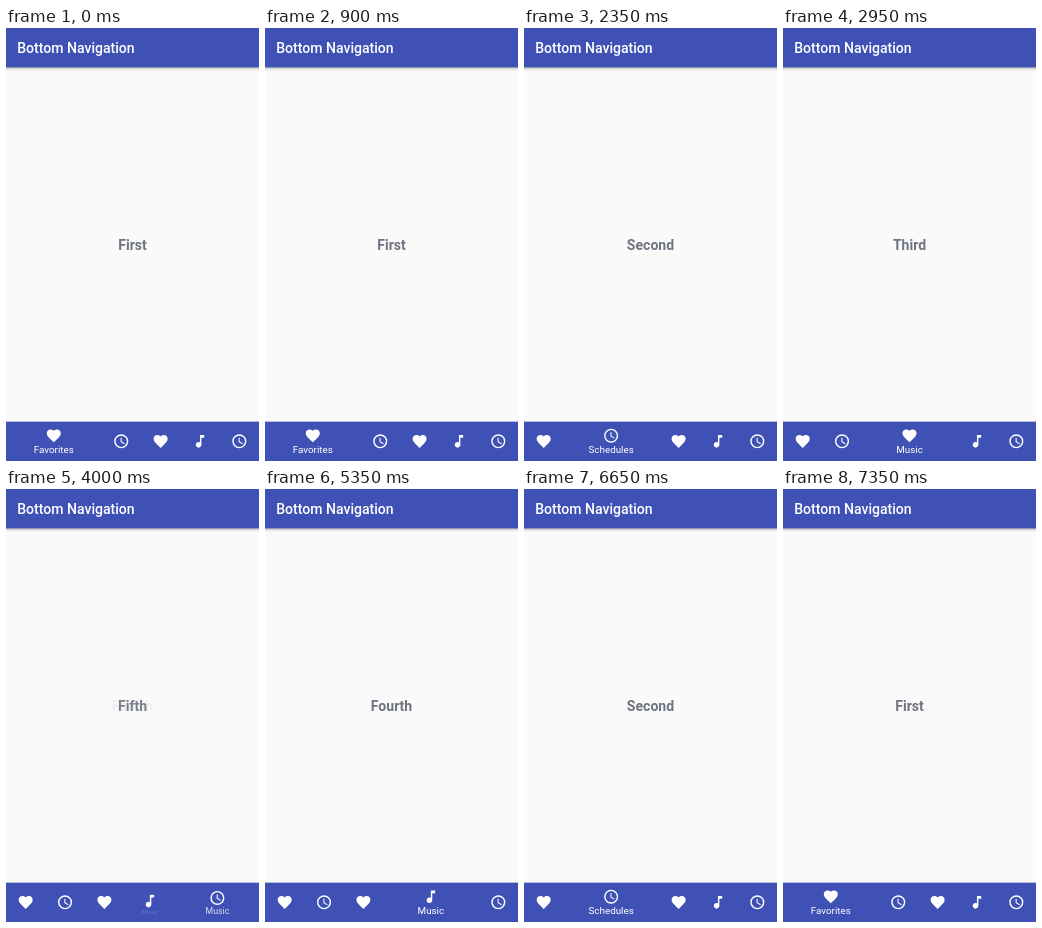
An HTML page with a canvas for the animation above (7400 ms loop, 253 by 433 pixels).

```html
<!DOCTYPE html>
<html lang="en">
<head>
<meta charset="utf-8">
<title>Bottom Navigation</title>
<style>
html, body { margin: 0; width: 100%; height: 100%; overflow: hidden; background: #fafafa; }
canvas { display: block; width: 253px; height: 433px; }
</style>
</head>
<body>
<canvas id="stage"></canvas>
<script>
const W = 253, H = 433, LOOP = 7400;
const DP = W / 360;
const BAR = 56 * DP, SMALL = 56 * DP, LARGE = W - 4 * SMALL;
const BLUE = '#3f51b5', PAPER = '#fafafa', INK = '#6f7382';
const FONT = 'Roboto, sans-serif';

const canvas = document.getElementById('stage');
const ctx = canvas.getContext('2d');
const ratio = window.devicePixelRatio || 1;
canvas.width = Math.round(W * ratio);
canvas.height = Math.round(H * ratio);

const heart = new Path2D('M12 21.35l-1.45-1.32C5.4 15.36 2 12.28 2 8.5 2 5.42 4.42 3 7.5 3c1.74 0 3.41.81 4.5 2.09C13.09 3.81 14.76 3 16.5 3 19.58 3 22 5.42 22 8.5c0 3.78-3.4 6.86-8.55 11.54z');
const note = new Path2D('M12 3v10.55c-.59-.34-1.27-.55-2-.55-2.21 0-4 1.79-4 4s1.79 4 4 4 4-1.79 4-4V7h4V3z');
const hands = new Path2D('M12.5 7H11v6l5.25 3.15.75-1.23-4.5-2.67z');

const tabs = [
  { page: 'First', label: 'Favorites', short: 'Favorit…', icon: heart },
  { page: 'Second', label: 'Schedules', short: 'Schedu…', icon: 'clock' },
  { page: 'Third', label: 'Music', icon: heart },
  { page: 'Fourth', label: 'Music', icon: note },
  { page: 'Fifth', label: 'Music', icon: 'clock' }
];

// [time of tap, tab selected]
const taps = [
  [1655, 1], [2350, 2], [3150, 3], [3850, 4],
  [4750, 3], [5350, 2], [5893, 1], [6650, 0]
];
const FADE = { delay: 53, span: 250 };
const SHIFT = { delay: 92, span: 115 };

const clamp = x => Math.min(1, Math.max(0, x));
const mix = (a, b, k) => a + (b - a) * k;
const quintOut = x => 1 - Math.pow(1 - x, 5);

// cubic-bezier(.4, 0, .2, 1)
function standardEase(x) {
  if (x <= 0 || x >= 1) return clamp(x);
  let lo = 0, hi = 1, u;
  for (let i = 0; i < 20; i++) {
    u = (lo + hi) / 2;
    const bx = 1.2 * u * (1 - u) ** 2 + 0.6 * u * u * (1 - u) + u ** 3;
    if (bx < x) lo = u; else hi = u;
  }
  return 3 * u * u * (1 - u) + u ** 3;
}

function stateAt(t) {
  let from = 0, to = 0, start = -1e4;
  for (const [time, tab] of taps) {
    if (t < time) break;
    from = to;
    to = tab;
    start = time;
  }
  const part = ({ delay, span }) => clamp((t - start - delay) / span);
  return {
    from, to,
    fade: quintOut(part(FADE)),
    shift: standardEase(part(SHIFT)),
    moving: t >= start + SHIFT.delay - 4 && part(SHIFT) < 1
  };
}

function drawText(str, x, y, font, color, align) {
  ctx.font = font + ' ' + FONT;
  ctx.fillStyle = color;
  ctx.textAlign = align;
  ctx.fillText(str, x, y);
}

function drawIcon(icon, x, y) {
  ctx.save();
  ctx.translate(x, y);
  ctx.scale(DP, DP);
  ctx.translate(-12, -12);
  ctx.fillStyle = ctx.strokeStyle = '#fff';
  if (icon === 'clock') {
    ctx.lineWidth = 2;
    ctx.beginPath();
    ctx.arc(12, 12, 9, 0, Math.PI * 2);
    ctx.stroke();
    ctx.fill(hands);
  } else {
    ctx.fill(icon);
  }
  ctx.restore();
}

function drawLabel(tab, x, on, cut) {
  const scale = mix(0.5, 1, on);
  ctx.save();
  ctx.globalAlpha = on;
  ctx.translate(x, 425);
  ctx.scale(scale, scale);
  ctx.font = `${14 * DP}px ${FONT}`;
  const left = -ctx.measureText(tab.label).width / 2;
  drawText(cut && tab.short || tab.label, left, 0, `${14 * DP}px`, '#fff', 'left');
  ctx.restore();
}

function drawPage(name, alpha) {
  if (alpha <= 0) return;
  ctx.globalAlpha = alpha;
  drawText(name, W / 2, 222, `bold ${20 * DP}px`, INK, 'center');
  ctx.globalAlpha = 1;
}

function drawToolbar() {
  const shade = ctx.createLinearGradient(0, BAR, 0, BAR + 4);
  shade.addColorStop(0, 'rgba(0,0,0,.26)');
  shade.addColorStop(0.5, 'rgba(0,0,0,.08)');
  shade.addColorStop(1, 'rgba(0,0,0,0)');
  ctx.fillStyle = shade;
  ctx.fillRect(0, BAR - 0.5, W, 4.5);
  ctx.fillStyle = BLUE;
  ctx.fillRect(0, 0, W, BAR);
  drawText('Bottom Navigation', 16 * DP, 25, `500 ${20 * DP}px`, '#fff', 'left');
}

function drawTabs(s) {
  ctx.fillStyle = BLUE;
  ctx.fillRect(0, H - BAR, W, BAR);
  let x = 0;
  tabs.forEach((tab, i) => {
    const on = i === s.to ? (s.from === s.to ? 1 : s.shift)
      : i === s.from ? 1 - s.shift : 0;
    const width = mix(SMALL, LARGE, on);
    const mid = x + width / 2;
    drawIcon(tab.icon, mid, H - BAR + mix(28, 20, on) * DP);
    if (on > 0) drawLabel(tab, mid, on, s.moving && i === s.from);
    x += width;
  });
}

function draw(t) {
  const s = stateAt(t);
  ctx.setTransform(ratio, 0, 0, ratio, 0, 0);
  ctx.fillStyle = PAPER;
  ctx.fillRect(0, 0, W, H);
  if (s.from !== s.to) drawPage(tabs[s.from].page, 1 - s.fade);
  drawPage(tabs[s.to].page, s.from === s.to ? 1 : s.fade);
  drawToolbar();
  drawTabs(s);
}

let origin;
function tick(now) {
  if (origin === undefined) origin = now;
  draw((now - origin) % LOOP);
  requestAnimationFrame(tick);
}
draw(0);
requestAnimationFrame(tick);
</script>
</body>
</html>
```
